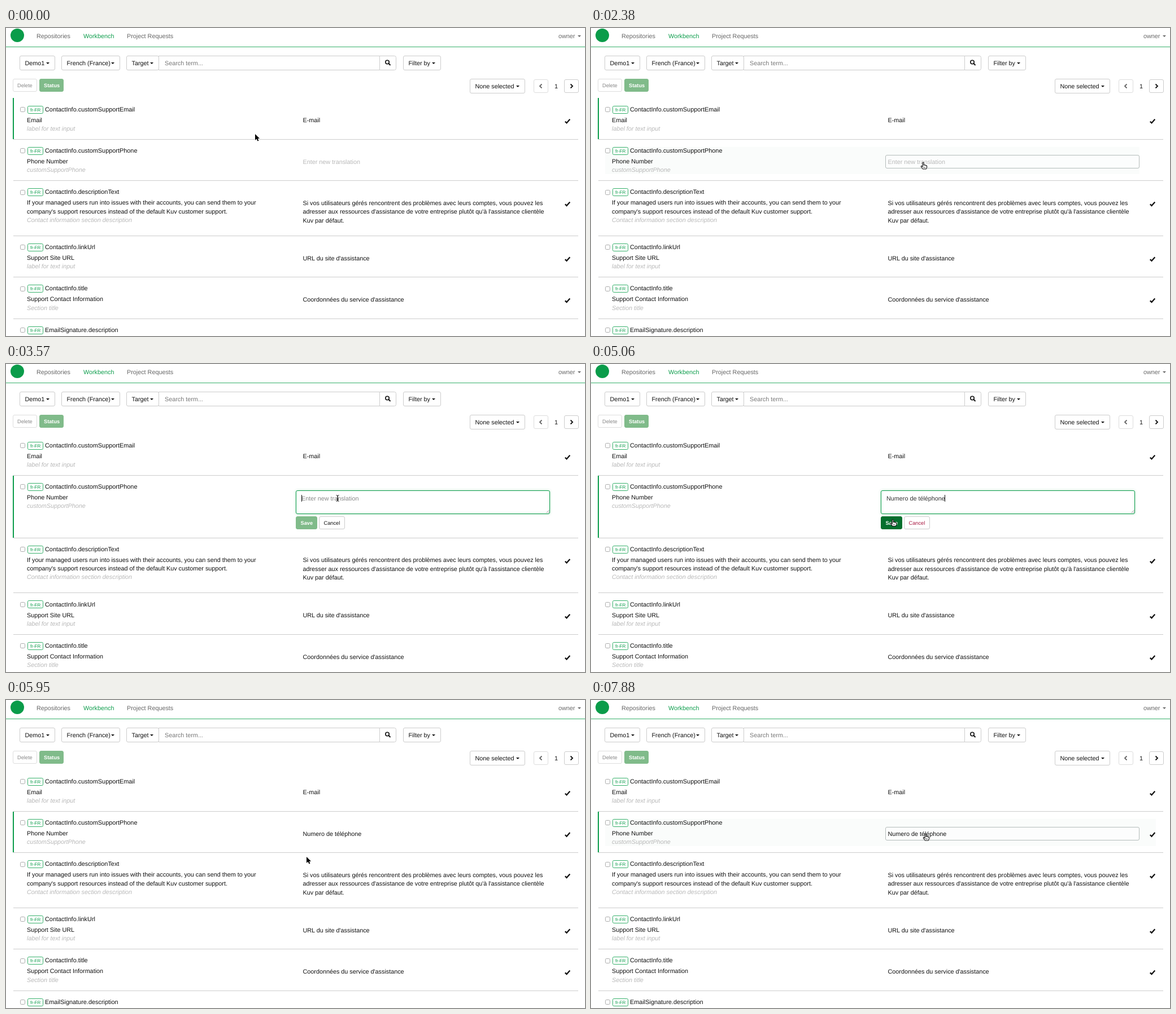
An HTML page with a canvas that plays this animation: 1025x546 px, repeating every 8000 ms.

```html
<!DOCTYPE html>
<html lang="en">
<head>
<meta charset="utf-8">
<title>Translation workbench</title>
<style>
  html, body { margin: 0; width: 100%; height: 100%; overflow: hidden; background: #fff; }
  canvas { display: block; }
</style>
</head>
<body>
<canvas id="stage" width="1025" height="546"></canvas>
<script>
const ctx = document.getElementById('stage').getContext('2d');
const LOOP = 8000, GREEN = '#0a9c4a', PALE = '#80bb8a';
const INK = '#111', MUTED = '#666', FAINT = '#b8b8b8';
const SIZE = 10.8, SMALL = 9.24, LINE = 15.3, ROW = 73.3, FORM = 37.5;

const OPEN = 2520, FOCUS = 2670, TYPED = 4010, PRESS = 5500, SAVED = 5950;
const answer = 'Numero de téléphone';

const rows = [
  { key: 'ContactInfo.customSupportEmail', source: ['Email'],
    note: 'label for text input', target: ['E-mail'] },
  { key: 'ContactInfo.customSupportPhone', source: ['Phone Number'],
    note: 'customSupportPhone', target: [] },
  { key: 'ContactInfo.descriptionText',
    source: ['If your managed users run into issues with their accounts, you can send them to your',
      "company's support resources instead of the default Kuv customer support."],
    note: 'Contact information section description',
    target: ['Si vos utilisateurs gérés rencontrent des problèmes avec leurs comptes, vous pouvez les',
      "adresser aux ressources d'assistance de votre entreprise plutôt qu'à l'assistance clientèle",
      'Kuv par défaut.'] },
  { key: 'ContactInfo.linkUrl', source: ['Support Site URL'],
    note: 'label for text input', target: ["URL du site d'assistance"] },
  { key: 'ContactInfo.title', source: ['Support Contact Information'],
    note: 'Section title', target: ["Coordonnées du service d'assistance"] },
  { key: 'EmailSignature.description', source: [], note: '', target: [] }
];

function text(str, x, y, color = INK, size = SIZE, style = '') {
  ctx.font = `${style} ${size}px "Liberation Sans", Arial, sans-serif`;
  ctx.fillStyle = color;
  ctx.fillText(str, x, y);
}

function panel(x, y, w, h, border, fill = '#fff', radius = 2.5) {
  ctx.beginPath();
  ctx.roundRect(x + .5, y + .5, w - 1, h - 1, radius);
  ctx.fillStyle = fill;
  ctx.fill();
  ctx.strokeStyle = border;
  ctx.lineWidth = 1;
  ctx.stroke();
}

function line(points, color, width) {
  ctx.beginPath();
  points.forEach(([x, y]) => ctx.lineTo(x, y));
  ctx.strokeStyle = color;
  ctx.lineWidth = width;
  ctx.stroke();
}

function rect(x, y, w, h, color) {
  ctx.fillStyle = color;
  ctx.fillRect(x, y, w, h);
}

function caret(x, y, color = INK) {
  ctx.beginPath();
  ctx.moveTo(x, y - 1);
  ctx.lineTo(x + 6, y - 1);
  ctx.lineTo(x + 3, y + 2);
  ctx.fillStyle = color;
  ctx.fill();
}

function dropdown(label, x, y, w, caretX) {
  panel(x, y, w, 26, '#ccc');
  text(label, x + 9.5, y + 17);
  caret(caretX, y + 13);
}

function header() {
  ctx.beginPath();
  ctx.arc(20, 13, 12, 0, 7);
  ctx.fillStyle = GREEN;
  ctx.fill();
  text('Repositories', 54, 18, MUTED);
  text('Workbench', 137, 18, GREEN);
  text('Project Requests', 214, 18, MUTED);
  text('owner', 978, 18, MUTED);
  caret(1012, 14, MUTED);
  rect(0, 33, 1025, 1, '#35b06a');

  dropdown('Demo1', 24, 49, 63, 71);
  dropdown('French (France)', 98, 49, 104, 186);
  panel(270, 49, 392, 26, '#ccc', '#fff', 0);
  panel(661, 49, 30, 26, '#ccc', '#fff', [0, 3, 3, 0]);
  dropdown('Target', 213, 49, 58, 255);
  dropdown('Filter by', 703, 49, 67, 754);
  text('Search term...', 281, 66, '#777');
  ctx.beginPath();
  ctx.arc(675, 60.5, 3.2, 0, 7);
  ctx.strokeStyle = INK;
  ctx.lineWidth = 1.6;
  ctx.stroke();
  line([[677.5, 63], [680.5, 66]], INK, 2);

  panel(12, 90, 43, 23, '#ddd');
  text('Delete', 20, 105, '#888', SMALL);
  panel(59, 90, 43, 23, PALE, PALE);
  text('Status', 67, 105, '#fff', SMALL, 'bold');
  dropdown('None selected', 821, 90, 98, 903);
  panel(934, 91, 26, 24, '#ddd');
  panel(988, 91, 26, 24, '#ccc');
  line([[948.5, 99.5], [945, 103], [948.5, 106.5]], MUTED, 1.8);
  line([[999.5, 99.5], [1003, 103], [999.5, 106.5]], INK, 1.8);
  text('1', 971, 107);
}

function form(t) {
  const typed = t >= TYPED, pressed = t >= PRESS, over = t >= 5060;
  const focused = t >= FOCUS && !pressed;
  if (focused) {
    ctx.shadowColor = 'rgba(20,160,70,.45)';
    ctx.shadowBlur = 5;
    rect(514, 225, 448, 40, '#fff');
    ctx.shadowBlur = 0;
  }
  panel(513, 224, 450, 42, focused ? GREEN : pressed ? '#bbb' : '#8fcfa8');
  line([[956.5, 264], [962, 258.5]], '#999', 1);
  line([[959.5, 264], [962, 261.5]], '#999', 1);
  text(typed ? answer : 'Enter new translation', 523, 241.5, typed ? '#333' : '#888');

  const blinkOff = t >= 2970 && t < 3570 || t >= 4610 && t < 5060;
  if (!pressed && !blinkOff) rect(typed ? 626 : 523, 232, 1, 12, INK);

  if (pressed) panel(511, 268, 41, 27, '#6fbbe6', '#2b94d1', 4);
  const fill = pressed ? '#0a5a28' : over ? '#046f2d' : typed ? '#00953b' : PALE;
  panel(513, 270, 38, 23, fill, fill);
  text('Save', 521.5, 284.5, '#fff', SMALL, 'bold');
  panel(554, 270, 46, 23, '#ccc');
  text('Cancel', 562.5, 284.5, typed ? '#a81840' : INK, SMALL);
}

function list(t, pointer) {
  const open = t >= OPEN && t < SAVED, saved = t >= SAVED;
  const field = pointer.shape === 'hand' && !open;
  let y = 124;
  rows.forEach((row, i) => {
    const phone = i === 1;
    const height = ROW + (i === 2 ? 24.5 : 0) + (phone && open ? FORM : 0);
    const bottom = Math.floor(y + height);
    const hovered = t >= 7300 ? pointer.y >= y && pointer.y < bottom : field && phone;
    if (hovered) rect(25, y + 13.5, saved ? 975 : 946, i === 2 ? 60 : 48, '#fafcfb');
    rect(13, bottom, 1000, 1, '#ccc');
    if (i === (t < OPEN ? 0 : 1)) rect(12, Math.ceil(y), 2, bottom - Math.ceil(y), GREEN);

    panel(25, Math.round(y + 16), 9, 9, '#aaa', '#fff', 2);
    panel(38, Math.round(y + 13.5), 28, 14, '#35b06a', '#fff', 2);
    text('fr-FR', 43, y + 23.7, GREEN, 8);
    text(row.key, 69, y + 23.6, INK, 10.9);
    row.source.forEach((s, n) => text(s, 37, y + 42.6 + n * LINE));
    text(row.note, 37, y + 57.8 + (row.source.length - 1) * LINE, FAINT, SIZE, 'italic');

    if (phone && open) form(t);
    else {
      if (phone && field) panel(521, 225, 450, 24, '#b4bcba', '#fcfdfd');
      const target = phone && saved ? [answer] : row.target;
      target.forEach((s, n) => text(s, 525.5, y + 43.3 + n * LINE));
      if (target.length) line([[989.8, y + 41.7], [992.5, y + 44.4], [998.3, y + 37.8]], INK, 2.3);
      else if (phone) text('Enter new translation', 525.5, y + 43.3, FAINT);
    }
    y += height;
  });
}

const smooth = k => k * k * (3 - 2 * k);
const easeOut = k => 1 - (1 - k) ** 2;

// The pointer is sampled in five steps per move.
function glide(t, start, step, ease, x0, y0, x1, y1) {
  const k = ease(Math.min(5, Math.max(0, Math.floor((t - start) / step) + 1)) / 5);
  return { x: x0 + (x1 - x0) * k, y: y0 + (y1 - y0) * k };
}

function pointerAt(t) {
  if (t < FOCUS) {
    const p = glide(t, 300, 145, smooth, 441, 188, 588, 238);
    return { ...p, shape: t < 2380 ? 'arrow' : 'hand' };
  }
  if (t < SAVED) {
    const p = glide(t, 4610, 150, easeOut, 587, 238, 532, 277);
    const shape = t < TYPED ? 'beam' : t < 4610 ? 'none' : t < 4910 ? 'beam'
      : t < 5060 ? 'arrow' : t < 5800 ? 'hand' : 'arrow';
    return { ...p, shape };
  }
  const p = glide(t, 7300, 145, smooth, 532, 278, 592, 237);
  return { ...p, shape: p.y < 249 ? 'hand' : 'arrow' };
}

const arrow = new Path2D('M0 0V11L2.6 8.6L4.4 12.6L6.4 11.7L4.7 7.9H8Z');
const hand = new Path2D('M-1 1Q0-1 1 1V5Q2.5 4 3 5.3Q4.5 4.5 5 6Q6.6 5.5 6.6 7V9L5.2 12H-.5L-3.6 8Q-4 6-2.4 6.6L-1 8Z');

function drawPointer({ x, y, shape }) {
  ctx.save();
  ctx.translate(x, y);
  if (shape === 'beam') {
    line([[-2.5, -5.5], [0, -4.5], [2.5, -5.5]], INK, 1);
    line([[0, -5], [0, 5]], INK, 1.3);
    line([[-2.5, 5.5], [0, 4.5], [2.5, 5.5]], INK, 1);
    line([[-1.5, 1.5], [1.5, 1.5]], INK, 1);
  } else if (shape === 'arrow') {
    ctx.strokeStyle = '#fff';
    ctx.lineWidth = 1.6;
    ctx.stroke(arrow);
    ctx.fillStyle = '#000';
    ctx.fill(arrow);
  } else if (shape === 'hand') {
    ctx.fillStyle = '#fff';
    ctx.fill(hand);
    ctx.strokeStyle = INK;
    ctx.lineWidth = 1.1;
    ctx.stroke(hand);
    line([[1.2, 8], [1.2, 10.5]], INK, .7);
    line([[3.2, 8], [3.2, 10.5]], INK, .7);
  }
  ctx.restore();
}

function frame() {
  const t = performance.now() % LOOP;
  const pointer = pointerAt(t);
  ctx.textRendering = 'geometricPrecision';
  rect(0, 0, 1025, 546, '#fff');
  header();
  list(t, pointer);
  drawPointer(pointer);
  requestAnimationFrame(frame);
}
frame();
</script>
</body>
</html>
```
